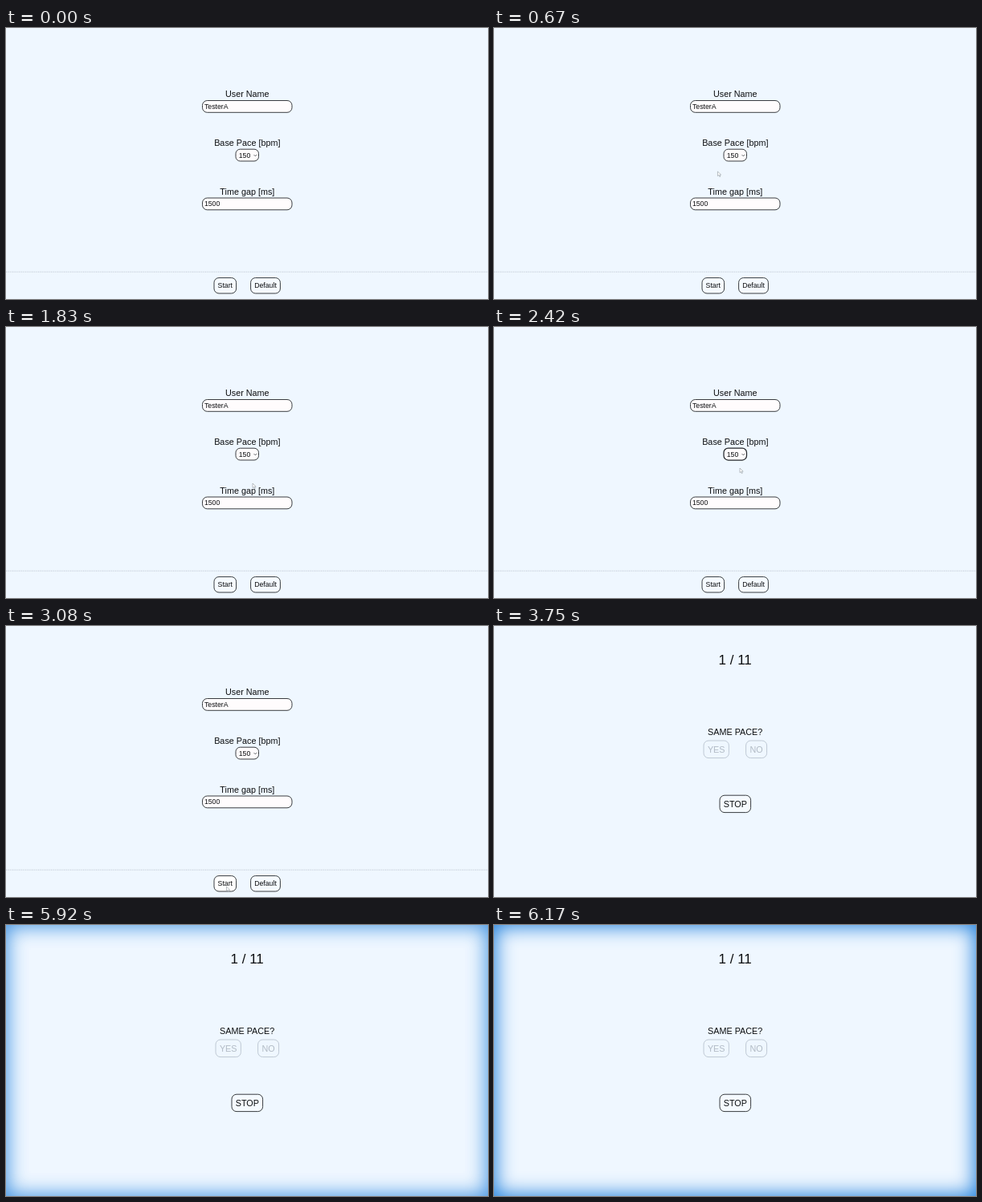
Animation of 600 by 338 pixels, one loop 8000 ms. Source, as an HTML page:

```html
<!DOCTYPE html>
<html lang="en">
<head>
<meta charset="utf-8">
<title>Pace test</title>
<style>
  html, body { margin: 0; width: 100%; height: 100%; overflow: hidden; background: #eff7ff; }
  svg, #glow { position: absolute; left: 0; top: 0; width: 600px; height: 338px; }
  #glow { box-shadow: inset 0 0 24px 2px #1f7fdc; }
  text { font: 10.8px "Liberation Sans", Arial, sans-serif; fill: #0c0e10; text-anchor: middle; }
  .small { font-size: 8.75px; }
  .value { font-size: 8.75px; text-anchor: start; }
  .count { font-size: 17px; }
  rect { fill: #f5faff; stroke: #24272b; stroke-width: .9; }
  .field { fill: #fffcfd; }
  .off rect { fill: none; stroke: #b9c3ce; }
  .off text { fill: #b1bac4; }
</style>
</head>
<body>
<svg viewBox="0 0 600 338">
  <g id="form">
    <text x="300.3" y="86.4">User Name</text>
    <rect class="field" x="244.5" y="90.5" width="111.5" height="14.8" rx="6"/>
    <text class="value" x="246.9" y="101.1">TesterA</text>
    <text x="300.3" y="146.9">Base Pace [bpm]</text>
    <rect class="field" id="select" x="286" y="151.2" width="28.5" height="14.8" rx="5.5"/>
    <text class="value" x="289.7" y="161.9">150</text>
    <path d="M308.6 158.1l1.7 1.7 1.7-1.7" fill="none" stroke="#33373b" stroke-width=".8"/>
    <text x="300.3" y="207.7">Time gap [ms]</text>
    <rect class="field" x="244.5" y="212" width="111.5" height="14.8" rx="6"/>
    <text class="value" x="246.9" y="222.4">1500</text>
    <path d="M0 304.2H600" stroke="#bcc5ce" stroke-width=".8" stroke-dasharray="1 .6"/>
    <rect id="start" x="259" y="311.6" width="27.6" height="19.4" rx="6"/>
    <text class="small" x="272.8" y="324.4">Start</text>
    <rect x="304.6" y="311.6" width="36.8" height="19.4" rx="6"/>
    <text class="small" x="323" y="324.4">Default</text>
  </g>
  <g id="quiz">
    <text class="count" x="300.2" y="48.3">1 / 11</text>
    <text x="300.2" y="135.9">SAME PACE?</text>
    <g class="off">
      <rect x="261" y="143" width="31.4" height="21.6" rx="6"/>
      <text x="276.7" y="157.6">YES</text>
      <rect x="313.6" y="143" width="26" height="21.6" rx="6"/>
      <text x="326.6" y="157.6">NO</text>
    </g>
    <rect x="281" y="211.2" width="38.6" height="21.4" rx="6"/>
    <text x="300.3" y="225.7">STOP</text>
  </g>
  <path id="cursor" d="M0 0V5.6L1.4 4.5 2.4 6.6 3.3 6.2 2.4 4.1H4.2Z" fill="#fff" stroke="#8d959d" stroke-width=".6"/>
</svg>
<div id="glow"></div>
<script>
const $ = id => document.getElementById(id);
const LOOP = 8000, STEP = 1000 / 12;

// pointer path: time, x, y
const path = [
  [80, 0, 316], [830, 317, 160], [920, 317, 160], [1170, 309, 157],
  [1330, 309, 157], [1830, 307, 195], [1990, 307, 195], [2250, 306, 176],
  [2420, 306, 176], [3080, 274.5, 325], [3170, 274.5, 325], [3670, 4, 325]
];

function pointer(t) {
  const i = path.findIndex(p => p[0] >= t);
  if (i < 0) return path.at(-1).slice(1);
  if (i === 0) return path[0].slice(1);
  const [t0, x0, y0] = path[i - 1], [t1, x1, y1] = path[i];
  const u = (t - t0) / (t1 - t0), e = u * u * (3 - 2 * u);
  return [x0 + (x1 - x0) * e, y0 + (y1 - y0) * e];
}

const show = (id, on) => $(id).style.display = on ? "" : "none";

function draw(now) {
  // the screen refreshes 12 times a second
  const t = Math.floor((now % LOOP + 4) / STEP) * STEP;
  const inForm = t < 3160;
  show("form", inForm);
  show("quiz", !inForm);
  show("cursor", t > 75 && t < 3740);
  $("cursor").setAttribute("transform", `translate(${pointer(t)})`);
  $("select").style.strokeWidth = t > 1990 && t < 2490 ? 1.25 : .9;
  $("start").style.fill = t > 2990 ? "#fff" : "";
  $("glow").style.opacity = t < 5825 ? 0 : Math.min(1, .66 + (t - 5833) / 490);
  requestAnimationFrame(draw);
}
requestAnimationFrame(draw);
</script>
</body>
</html>
```
